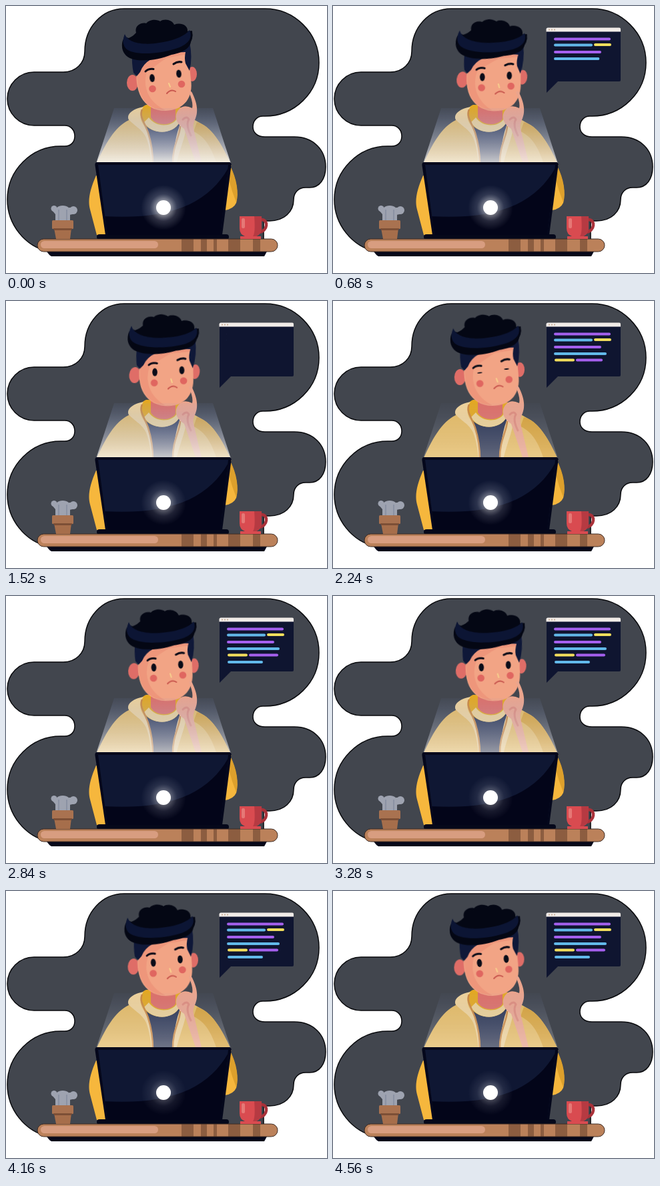
An HTML page that plays this animation: 481x400 px, repeating every 4.8 s.

```html
<!DOCTYPE html>
<html lang="en">
<head>
<meta charset="utf-8">
<title>Late night coding</title>
<style>
@property --typed { syntax: "<number>"; inherits: true; initial-value: 0; }
html, body { margin: 0; width: 100%; height: 100%; overflow: hidden; background: #fff; }
svg { display: block; width: 100%; height: 100%; }

.head, .eye, .brows, .beam, .glow, .bubble, .code { animation: 4.8s linear infinite; }
.head { animation-name: tilt; transform-origin: 236px 153px; }
.eye { animation-name: blink; transform-box: fill-box; transform-origin: center; }
.brows { animation-name: frown; }
.beam { animation-name: beam; }
.glow { animation-name: glow; }
.bubble { animation-name: pop; transform-origin: 320px 130px; }
.code { animation-name: type; }
.code rect {
  height: 4px; rx: 2px;
  transform-box: fill-box; transform-origin: left;
  transform: scaleX(clamp(0, var(--typed) - var(--i), 1));
}
.p { fill: #a560ee; }
.b { fill: #62b9ea; }
.y { fill: #f3de5c; }

@keyframes tilt {
  0% { transform: rotate(0deg); animation-timing-function: ease-in-out; }
  14.17% { transform: rotate(6deg); }
  22% { transform: rotate(6.2deg); }
  31.67% { transform: rotate(5.1deg); animation-timing-function: ease-in-out; }
  46.67% { transform: rotate(1.2deg); }
  59.17% { transform: rotate(3.1deg); }
  68% { transform: rotate(4.2deg); }
  78.33% { transform: rotate(3.8deg); animation-timing-function: ease-in-out; }
  95%, 100% { transform: rotate(.6deg); }
}
@keyframes blink {
  0%, 44.5%, 49%, 100% { transform: none; }
  46%, 47.5% { transform: scaleY(.16); }
}
@keyframes frown {
  0%, 44.5%, 49%, 100% { transform: none; }
  46%, 47.5% { transform: translateY(3px); }
}
@keyframes beam {
  0% { opacity: 1; }
  14.17% { opacity: .85; }
  31.67% { opacity: .85; }
  46.67% { opacity: .3; }
  59.17% { opacity: .75; }
  78.33% { opacity: .4; }
  95%, 100% { opacity: .33; }
}
@keyframes glow {
  0% { opacity: 1; }
  14.17% { opacity: .85; }
  31.67% { opacity: .7; }
  46.67% { opacity: .75; }
  59.17% { opacity: .65; }
  78.33% { opacity: .35; }
  95%, 100% { opacity: .5; }
}
@keyframes pop {
  0%, .8% { transform: scale(0); animation-timing-function: ease-out; }
  5%, 100% { transform: none; }
}
@keyframes type {
  0%, 6.1% { --typed: 0; }
  19.4%, 30.5% { --typed: 8; }
  30.51%, 35.2% { --typed: 0; }
  48.5%, 68.75% { --typed: 8; }
  68.76%, 71.8% { --typed: 0; }
  85%, 100% { --typed: 8; }
}
</style>
</head>
<body>
<svg viewBox="0 0 481 400">
  <defs>
    <linearGradient id="light" x1="0" y1="0" x2="0" y2="1">
      <stop offset="0" stop-color="#7f98d8" stop-opacity=".08"/>
      <stop offset=".45" stop-color="#c0c9e0" stop-opacity=".45"/>
      <stop offset=".8" stop-color="#e6e6ea" stop-opacity=".74"/>
      <stop offset="1" stop-color="#f8f6f0" stop-opacity=".94"/>
    </linearGradient>
    <radialGradient id="halo">
      <stop offset=".3" stop-color="#fff" stop-opacity=".55"/>
      <stop offset=".6" stop-color="#cfd2e0" stop-opacity=".2"/>
      <stop offset="1" stop-color="#cfd2e0" stop-opacity="0"/>
    </radialGradient>
    <clipPath id="desk"><rect x="47" y="349" width="360" height="19" rx="9.5"/></clipPath>
    <clipPath id="lid"><path d="M138 238H333L321 343H152Z"/></clipPath>
  </defs>

  <path fill="#42464e" stroke="#08090c" stroke-width="1.500" d="M177 4H388C432 4 469 40 469 85S432 165 388 165H385C376 165 370 172 370 181S377 196 388 196H432C460 196 479 215 479 241C479 259 470 272 455 272H449C438 272 431 280 431 290C431 308 417 322 395 322H386V352L64 368C28 360 2 327 2 290C2 246 38 210 82 210H88C97 210 103 204 103 195S97 179 88 179H42C20 179 2 161 2 139S20 99 42 99H86C104 99 118 86 118 68C118 32 144 4 177 4Z"/>

  <!-- Jacket -->
  <path fill="#e6bb62" d="M206 153C192 155 182 162 184 171C163 181 148 207 134 240H338C326 213 313 187 292 176L264 160Z"/>
  <path fill="#d9a338" d="M286 174C306 178 324 207 337 237H316C308 213 299 196 281 188Z"/>
  <path fill="#2b3451" d="M207 160L264 166C258 190 252 208 251 238H219C220 209 214 184 205 172Z"/>
  <path fill="#e3a823" d="M210 148C200 151 199 166 207 176C218 193 251 193 260 174L264 153L253 149Z"/>
  <path fill="#ecd093" d="M207 174C217 193 250 194 260 174L256 169C248 182 224 182 214 167Z"/>
  <path fill="#dd7068" d="M217 145H254V169C248 180 224 180 217 167Z"/>
  <path fill="#efd299" d="M206 151C189 154 180 163 184 170C190 178 204 184 210 197C215 210 217 224 218 238H220C221 212 215 189 206 178C199 168 201 158 206 151Z"/>
  <path fill="#efd299" d="M263 172C278 180 263 202 255 238H250C251 217 254 192 263 172Z"/>
  <path fill="none" stroke="#cb873f" stroke-width="2.500" d="M204 155C199 165 208 175 213 190C218 206 220 222 220 237M261 180C261 194 249 210 250 237"/>

  <g class="head">
    <ellipse cx="189.500" cy="115" rx="8.500" ry="12" fill="#df6d67"/>
    <ellipse cx="279" cy="102" rx="7" ry="11" fill="#df6d67"/>
    <path fill="#f2a485" d="M196 91C192 126 204 157 239 157C268 156 281 136 277 110L272 60L198 72Z"/>
    <path fill="#ee967b" d="M197 92C193 131 209 156 239 156C214 145 204 121 211 99L240 78L272 72V62L198 74Z"/>
    <path fill="#0f1838" d="M189 68L217 80Q205 87 201 99L196 105L191 100Q188 86 189 68ZM248 70L275 54Q280 77 275 97L269 86Q267 78 269 69Z"/>
    <g fill="#e06660">
      <circle cx="219.500" cy="124" r="5.300"/>
      <circle cx="263" cy="117" r="5.300"/>
    </g>
    <g fill="#0a0c18">
      <g transform="rotate(-6 219 108)"><ellipse class="eye" cx="219" cy="108" rx="3.800" ry="6"/></g>
      <g transform="rotate(-6 259 101.500)"><ellipse class="eye" cx="259" cy="101.500" rx="3.800" ry="6"/></g>
    </g>
    <path class="brows" fill="none" stroke="#0a0c18" stroke-width="3" stroke-linecap="round" d="M209 98Q214 93.500 221 94.500M251 87Q257 82.500 263 84"/>
    <path fill="none" stroke="#f7d08d" stroke-width="2" stroke-linecap="round" d="M244 116L246 121"/>
    <path fill="none" stroke="#c8564d" stroke-width="2" stroke-linecap="round" d="M241 131Q247 124 254 128"/>
    <path fill="#040714" d="M174 56C175 48 179 46 184 48C189 46 192 43 195 40C192 30 202 24 210 26C216 19 227 20 231 23C238 18 249 21 252 28C262 24 273 29 272 38C280 33 281 46 277 51C278 63 264 70 248 73C224 83 187 86 178 72Q173 66 174 56Z"/>
    <path fill="#0c1534" d="M178 42C184 58 212 59 236 54C253 51 268 45 275 36C281 49 271 59 254 64C226 73 188 74 179 63C174 57 175 49 178 42Z"/>
    <path fill="none" stroke="#040714" stroke-width="2" stroke-linecap="round" d="M175 57Q177 65 183 69M278 38Q280 50 274 56"/>
  </g>

  <!-- Hand on the cheek -->
  <path fill="#eba58d" d="M274 129Q277 126 279 130C284 141 287 149 286 160C285 170 279 175 281 184L293 234H284L267 184C255 177 250 164 260 154Q267 147 279 153Q281 145 274 129Z"/>
  <path fill="none" stroke="#df8d7c" stroke-width="3" stroke-linecap="round" d="M265 170Q271 164 274 170Q269 178 277 194"/>

  <path class="beam" fill="url(#light)" d="M162 153H310L337 236H135Z"/>

  <!-- Elbows -->
  <path fill="#f6b73d" d="M135 254C126 274 122 291 126 305L136 343H152L141 254Z"/>
  <path fill="#f6b73d" d="M335 238C345 258 349 281 345 295Q341 304 328 306Z"/>
  <path fill="#dda02c" d="M336 240C346 259 349 280 345 294Q338 277 334 260Z"/>

  <!-- Laptop -->
  <rect x="136" y="342" width="198" height="8" rx="4" fill="#05081a"/>
  <path fill="#04071b" d="M135.500 234H335.500Q338 235 337.500 239L324 343H149L133.500 239Q133 235 135.500 234Z"/>
  <g clip-path="url(#lid)">
    <path fill="#0f1733" d="M137 238H334L321 343H151Z"/>
    <path fill="#030519" d="M335 239C306 294 250 321 146 315L148 344H326Z"/>
  </g>
  <circle class="glow" cx="236" cy="302" r="34" fill="url(#halo)"/>
  <circle cx="236" cy="302" r="11" fill="#fff"/>

  <!-- Desk -->
  <path fill="#05071a" d="M60 366H392L387 375H68Q64 373 60 366Z"/>
  <g clip-path="url(#desk)">
    <path fill="#bb815a" d="M47 349H407V368H47Z"/>
    <path fill="#8c5d40" d="M263 349h18v19h-18zM292 349h9v19h-9zM311 349h5v19h-5zM333 349h18v19h-18zM370 349h11v19h-11z"/>
    <rect x="52" y="352" width="176" height="11" rx="5.500" fill="#d89d80"/>
  </g>
  <rect x="47" y="349" width="360" height="19" rx="9.500" fill="none" stroke="#3d2a22"/>

  <!-- Cactus -->
  <g fill="#9ea3b0">
    <path d="M74 322V309Q74 299 85 299T96 309V322Z"/>
    <circle cx="72" cy="303.500" r="4.500"/>
    <circle cx="101" cy="306" r="6"/>
    <path d="M69 306L74 312H80L76 302ZM94 302H101L104 311L95 313Z"/>
  </g>
  <path fill="none" stroke="#8b92a3" stroke-width="2" d="M79 305V321M91 305V321"/>
  <path fill="#a66e4b" d="M72 333H98L96 349H75Z"/>
  <rect x="69" y="321" width="32" height="13" rx="1.500" fill="#a97250"/>
  <path fill="#7d4f36" d="M71 333H99L98 336H72Z"/>

  <!-- Mug -->
  <path fill="none" stroke="#a93139" stroke-width="4.500" d="M380 320H383C393 320 393 337 379 339"/>
  <path fill="#d94b50" d="M350 315H383V333Q382 342 375 345H382V349H351V345H358Q350 342 350 333Z"/>
  <path fill="#b63a42" d="M372 315H383V333Q382 342 375 345H370Q374 340 372 315Z"/>
  <rect x="353" y="318" width="5" height="15" rx="2" fill="#e67876"/>

  <!-- Code window -->
  <g class="bubble">
    <path fill="#0f1530" d="M320 34H431V111Q431 113 429 113H337L320 130Z"/>
    <path fill="#f1ece8" d="M322 32.500H429Q431 32.500 431 34.500V38.500H319.500V34.500Q320 32.500 322 32.500Z"/>
    <g fill="#c4a58c">
      <circle cx="324" cy="35.500" r="1"/>
      <circle cx="328" cy="35.500" r="1"/>
      <circle cx="332" cy="35.500" r="1"/>
    </g>
    <g class="code">
      <rect class="p" style="--i:0" x="331" y="47.500" width="85"/>
      <rect class="b" style="--i:1" x="331" y="56.500" width="58"/>
      <rect class="y" style="--i:2" x="391" y="56" width="26"/>
      <rect class="p" style="--i:3" x="331" y="67" width="71"/>
      <rect class="b" style="--i:4" x="331" y="77" width="79"/>
      <rect class="y" style="--i:5" x="332" y="86.500" width="30"/>
      <rect class="p" style="--i:6" x="364" y="86.500" width="44"/>
      <rect class="b" style="--i:7" x="332" y="97" width="53"/>
    </g>
  </g>
</svg>
</body>
</html>
```
